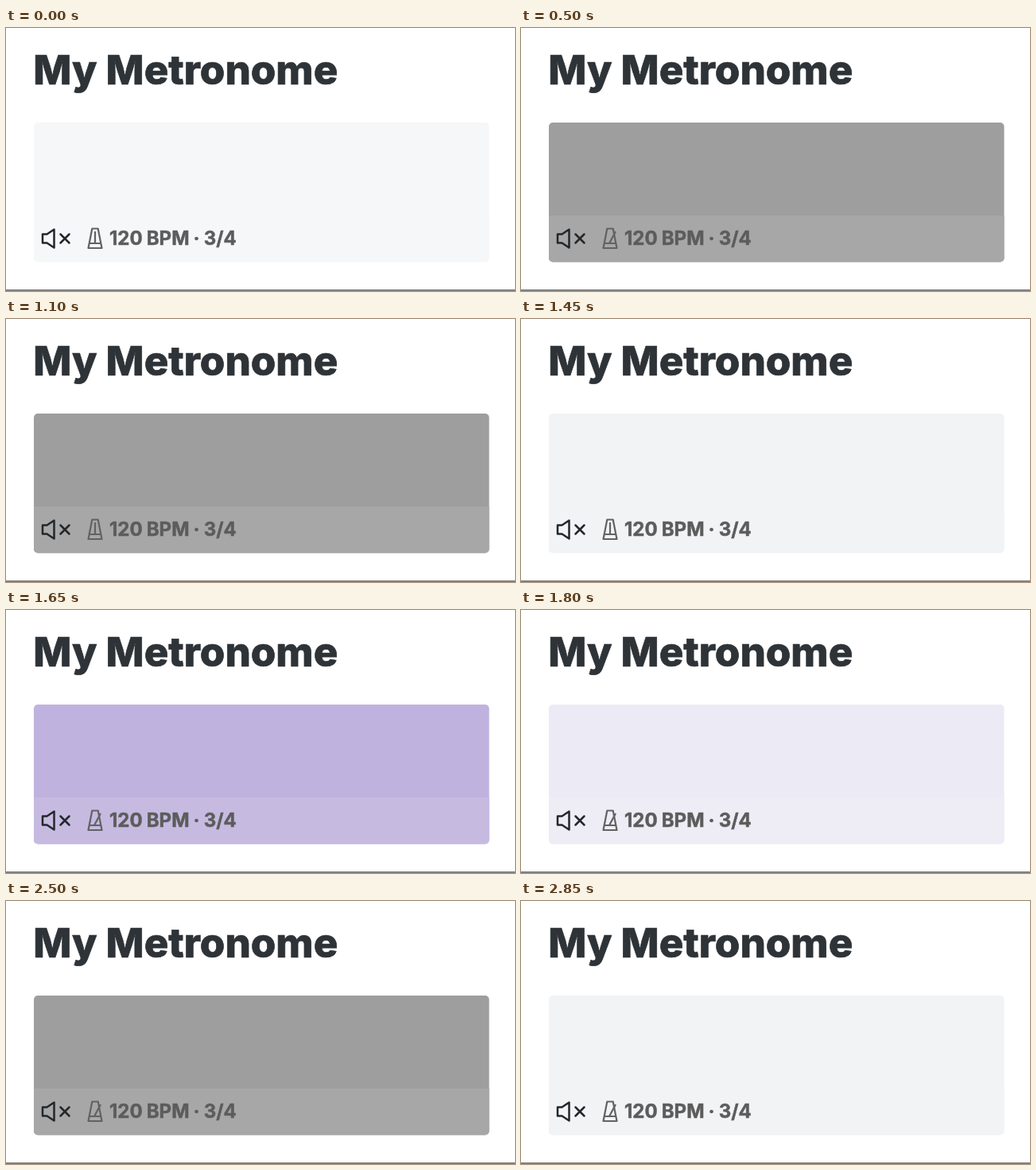
Animation of 640x331 px, one loop 2900 ms. Source, as an HTML page:

```html
<!DOCTYPE html>
<html lang="en">
<head>
<meta charset="utf-8">
<title>Metronome</title>
<style>
  html, body { margin: 0; width: 100%; height: 100%; overflow: hidden; background: #fff; }
  svg { display: block; width: 640px; height: 331px; }
  text { font-family: Inter, sans-serif; font-optical-sizing: none; }
  .title { font-size: 51px; font-weight: 800; fill: #2e3338; stroke: #2e3338; stroke-width: 0.7; }
  .tempo { font-size: 24px; font-weight: 700; word-spacing: -0.6px; fill: #5c5c5c; stroke: #5c5c5c; stroke-width: 0.5; }
  .mute, .icon { fill: none; stroke-linejoin: round; }
  .mute { stroke: #23272b; stroke-width: 2.5; stroke-linecap: round; }
  .icon { stroke: #626262; stroke-width: 2.2; }
</style>
</head>
<body>
<svg viewBox="0 0 640 331">
  <clipPath id="card"><rect x="35" y="119" width="572.5" height="175.5" rx="5"/></clipPath>
  <text class="title" x="34.2" y="71">My Metronome</text>
  <g clip-path="url(#card)">
    <rect id="panel" x="35" y="119" width="573" height="176"/>
    <rect id="bar" x="35" y="236" width="573" height="59"/>
  </g>
  <g class="mute">
    <path d="M46 259.5H51.5L60.5 253.5V276.5L51.5 270.5H46Z"/>
    <path d="M68.5 259.5L79.5 270.5M79.5 259.5L68.5 270.5"/>
  </g>
  <g class="icon">
    <path d="M108.3 252.5H115.7L120.5 277H103.5ZM105 271H119"/>
    <path id="arm"/>
  </g>
  <text class="tempo" x="130" y="272.5">120 BPM · 3/4</text>
  <rect y="329" width="640" height="2" fill="#808080"/>
</svg>
<script>
  const LOOP = 2900, STEP = 50, BEAT = 480, FIRST = 20;
  const HOLD = 130, FADE = 330;
  const IDLE = [246, 247, 249];
  // Peak colour, and the fade power of the panel and of the bar.
  const STRONG = { color: [164, 143, 208], panel: 2.05, bar: 2.15 };
  const WEAK = { color: [158, 158, 158], panel: 1.5, bar: 2.8 };
  const UPRIGHT = 'M112 256V271', TILTED = 'M111 271L119 256';

  const byId = id => document.getElementById(id);
  const panel = byId('panel'), bar = byId('bar'), arm = byId('arm');

  const mix = (color, k) =>
    `rgb(${IDLE.map((c, i) => Math.round(c + (color[i] - c) * k))})`;

  function glow(age, power) {
    const left = 1 - Math.min(1, Math.max(0, (age - HOLD) / FADE));
    return Math.max(0.045, left ** power);
  }

  function draw(time) {
    const t = Math.floor(time % LOOP / STEP) * STEP;
    const beat = Math.floor((t - FIRST) / BEAT);
    const age = t - FIRST - beat * BEAT;
    const kind = beat % 3 === 0 ? STRONG : WEAK;
    const on = beat < 0 ? 0 : 1;
    panel.setAttribute('fill', mix(kind.color, on * glow(age, kind.panel)));
    bar.setAttribute('fill', mix(kind.color, on * 0.9 * glow(age, kind.bar)));
    arm.setAttribute('d', on && beat % 2 ? TILTED : UPRIGHT);
  }

  const start = performance.now();
  function tick() {
    draw(performance.now() - start);
    requestAnimationFrame(tick);
  }
  tick();
</script>
</body>
</html>
```
